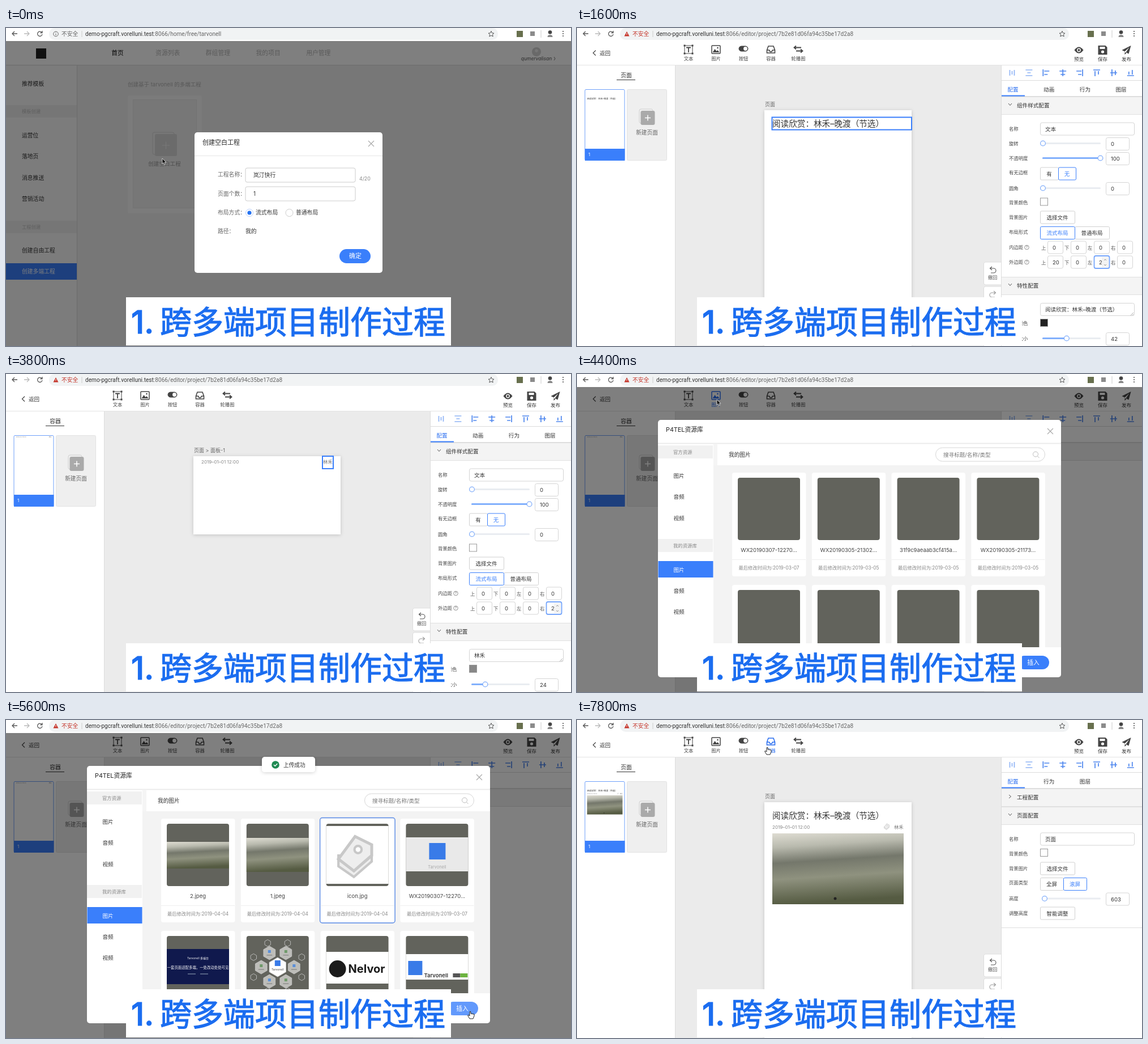
Write an HTML page that moves like this. It is 998x561 px and loops after 8 s.

```html
<!DOCTYPE html>
<html lang="zh">
<head>
<meta charset="utf-8">
<style>
html, body { margin: 0; width: 100%; height: 100%; overflow: hidden; background: #fff; }
svg { display: block; width: 100vw; height: 100vh; font-family: Inter, "Noto Sans CJK SC", "Noto Sans CJK", sans-serif; }
</style>
</head>
<body>
<svg id="stage" viewBox="0 0 998 561"></svg>
<script>
const BLUE = '#3a7ffb', INK = '#333', GREY = '#777', LINE = '#dcdcdc', SLATE = '#62635c';
const STEP = 200, LOOP = 8000;
const TITLE = '阅读欣赏：林禾–晚渡（节选）', DATE = '2019–01–01 12:00';

// Drawing helpers
const rect = (x, y, w, h, fill, stroke = 'none', rx = 0, sw = 1) =>
  `<rect x="${x}" y="${y}" width="${w}" height="${h}" fill="${fill}" stroke="${stroke}" rx="${rx}" stroke-width="${sw}"/>`;
const text = (x, y, str, size = 9.5, fill = INK, more = '') =>
  `<text x="${x}" y="${y}" font-size="${size}" fill="${fill}" ${more}>${str}</text>`;
const mid = (x, y, str, size, fill, more = '') => text(x, y, str, size, fill, `text-anchor="middle" ${more}`);
const path = (d, stroke = INK, sw = 1, fill = 'none') =>
  `<path d="${d}" stroke="${stroke}" stroke-width="${sw}" fill="${fill}"/>`;
const circle = (x, y, r, fill, stroke = 'none', sw = 1) =>
  `<circle cx="${x}" cy="${y}" r="${r}" fill="${fill}" stroke="${stroke}" stroke-width="${sw}"/>`;
const at = (x, y, body, scale = 1) => `<g transform="translate(${x} ${y}) scale(${scale})">${body}</g>`;
const cross = (x, y) => path(`M${x - 5} ${y - 5}l10 10m0-10l-10 10`, '#aaa', 1.2);
const shade = rect(0, 23, 998, 538, 'rgba(0,0,0,.5)');
const many = (list, fn) => list.map(fn).join('');

const defs = `<defs>
  <linearGradient id="view" x2=".12" y2="1">
    <stop offset="0" stop-color="#dedcd2"/><stop offset=".2" stop-color="#b9baae"/>
    <stop offset=".42" stop-color="#74776b"/><stop offset=".65" stop-color="#8f927f"/>
    <stop offset="1" stop-color="#555b42"/></linearGradient>
  <filter id="soft" x="-10%" y="-10%" width="120%" height="130%">
    <feDropShadow dx="0" dy="1" stdDeviation="3" flood-opacity=".18"/></filter>
  <clipPath id="list"><rect x="241" y="161" width="614" height="321"/></clipPath>
</defs>`;

const tag = path('M-14 9L-1 18L14 5V0H-14Z', '#c8c8c8', 2, '#eee') +
  path('M0-16L14-9V0L-1 13L-14 3Z', '#c8c8c8', 2.4, '#eee') + circle(2.5, -5, 3, '#fff', '#c8c8c8', 2);

function browser(s) {
  const home = s.view === 'home', warn = home ? '#666' : '#c5372c';
  const route = home ? '/home/free/tarvonell' : '/editor/project/7b2e81d06fa94c35be17d2a8';
  return rect(0, 0, 998, 23, '#fff') + rect(76, 0, 793, 21, '#f1f3f4', 'none', 10) +
    path('M20 10H11M15 6l-4 4l4 4', '#555', 1.3) + path('M32 10h9M37 6l4 4l-4 4', '#bbb', 1.3) +
    path('M63 7.5A4.2 4.2 0 1 0 64 11M64 5v3.5h-3.5', '#555', 1.3) +
    (home ? circle(88, 10.5, 4.3, 'none', '#666') + path('M88 10v3M88 7.8v1', '#666')
      : path('M88 6L92.5 14.5H83.5Z', 'none', 0, warn) + path('M88 9v3', '#fff')) +
    text(98, 14, '不安全', 9.8, warn) + path('M134 5v11', '#ccc') +
    text(140, 14, `demo-pgcraft.vorelluni.test<tspan fill="#666">:8066${route}</tspan>`, 10.1, INK,
      'font-family="Roboto, sans-serif"') +
    path('M857 5.5l1.5 3.3l3.5.4l-2.6 2.3l.8 3.5l-3.2-1.8l-3.2 1.8l.8-3.5l-2.6-2.3l3.5-.4z', '#555') +
    rect(902, 5, 11, 11, '#68704e') + rect(926, 6, 8, 8, '#8b8b8b') + path('M945 4v13', '#ccc') +
    circle(961, 7.5, 3.3, '#444') + path('M956.5 16q0-4 4.5-4t4.5 4z', 'none', 0, '#888') +
    many([6, 10, 14], y => circle(984, y, 1.1, '#555'));
}

function home() {
  const side = [['推荐模板', 102], ['运营位', 193], ['落地页', 230], ['消息推送', 268], ['营销活动', 305], ['创建自由工程', 396]];
  return rect(0, 23, 998, 538, '#efefef') + rect(0, 23, 998, 42, '#fff') + rect(0, 65, 125, 496, '#fafafa') +
    path('M0 65.5H998M125.5 66V561', '#d8d8d8') + rect(53, 36, 18, 18, '#222') +
    many(['首页', '资源列表', '群组管理', '我的项目', '用户管理'],
      (n, i) => mid(197 + 88.7 * i, 48, n, 10.8, i ? '#b4b4b4' : '#111')) +
    circle(937, 42, 8, '#d4d4d4') + circle(937, 40, 2.8, '#eee') +
    mid(937, 57, 'qumervalisan', 8.5, '#555', 'font-style="italic"') + path('M968 51l2 3l-2 3', GREY) +
    many(side, ([n, y]) => text(28, y, n, 9.8)) +
    many([[136, '模板创建'], [340, '工程创建']], ([y, n]) => rect(0, y, 125, 22, '#eee') + text(28, y + 14, n, 8.3, '#bbb')) +
    rect(0, 415, 125, 29, BLUE) + text(28, 433, '创建多端工程', 9.8, '#fff') +
    text(215, 103, '创建基于 tarvonell 的多端工程', 9.5, '#b0b0b0') +
    rect(215, 119, 131, 208, '#f8f8f8', 'none', 3) + rect(224.5, 126.5, 112, 191, '#efefef', '#e6e6e6') +
    rect(259, 184, 38, 39, 'none', '#d6d6d6', 3) + rect(263, 187, 39, 39, '#d8d8d8', 'none', 3) +
    path('M276 207h13M282.5 200.5v13', '#f2f2f2') + mid(280, 243, '创建空白工程', 9.6, '#999');
}

function newDialog() {
  const labels = [['工程名称：', 262], ['页面个数：', 296], ['布局方式：', 329], ['路径：', 362]];
  return shade + rect(333, 184, 332, 248, '#fff', 'none', 5) +
    text(347, 206, '创建空白工程', 11, '#222', 'font-weight="500"') + cross(645, 204) + path('M333 225.5H665', '#e6e6e6') +
    many(labels, ([n, y]) => text(374, y, n, 9.8, '#666')) +
    many([247, 280], y => rect(423, y, 194, 25, '#fff', '#ccc', 3)) +
    text(437, 263, '岚汀快行', 9.8) + text(437, 296, '1', 9.8) + text(624, 269, '4/20', 8.8, '#888') +
    circle(430, 326, 6.5, '#fff', '#b8cffc') + circle(430, 326, 3.6, '#2372f2') + text(441, 329, '流式布局', 9.8) +
    circle(500.5, 326, 6.5, '#fff', '#ccc') + text(512, 329, '普通布局', 9.8) + text(423, 362, '我的', 9.8) +
    rect(589, 390, 55, 25, BLUE, 'none', 12.5) + mid(617, 406, '确定', 11, '#fff', 'font-weight="500"');
}

const toolIcons = [
  c => path('M-7-7H7V7H-7Z', c, 1) + path('M-4-3.5H4M0-3.5V5', c, 1.8) +
    many([[-7, -7], [7, -7], [-7, 7], [7, 7]], ([x, y]) => rect(x - 1.5, y - 1.5, 3, 3, c)),
  c => rect(-7.5, -7, 15, 14, 'none', c, 1, 1.5) + path('M-6 5l4-6l3 4l2-2l3 4z', 'none', 0, c) + circle(3, -3, 1.3, c),
  c => rect(-8, -6, 16, 9, c, c, 4.5) + circle(3.5, -1.5, 3.4, '#fff'),
  c => path('M-7 1L-4.5-6H4.5L7 1V6H-7ZM-7 1H-3Q-2 4 0 4T3 1H7', c, 1.6),
  c => path('M-7-3.5H5M-4-6.5l-3.5 3l3.5 3M7 2.5H-4M4-.5l3.5 3l-3.5 3', c, 1.8),
];
const actionIcons = [
  path('M-8 0Q0-11 8 0Q0 11-8 0Z', 'none', 0, '#444') + circle(0, 0, 3.4, '#fff') + circle(0, 0, 2, '#444'),
  path('M-8-8H5L8-5V8H-8Z', 'none', 0, '#444') + rect(-5, -6, 9, 4, '#fff') + circle(0, 3, 2.6, '#fff'),
  path('M8-8L-8 0L-3 2.5L5-5L-1 4L4 6.5ZM-3 3.5V8L0 5Z', 'none', 0, '#444'),
];

function toolbar(s) {
  return rect(0, 23, 998, 42, '#fff') + path('M0 65.5H998', '#e4e4e4') +
    path('M33 39.5l-4.5 4.5l4.5 4.5', '#444', 1.2) + text(40, 48, '返回', 9.6) +
    many(['文本', '图片', '按钮', '容器', '轮播图'], (n, i) => {
      const x = 197 + 48.5 * i, c = s.hover === i ? '#2b6ff0' : '#444';
      return at(x, 38, toolIcons[i](c)) + mid(x, 57, n, 8.3, c);
    }) +
    many(['预览', '保存', '发布'], (n, i) => at(886.5 + 42 * i, 39, actionIcons[i]) + mid(886.5 + 42 * i, 58, n, 8.5));
}

// Contents of the page being edited, shared by the canvas and the thumbnail
function content(s) {
  const page = s.view === 'page', base = page ? 192 : 158;
  let out = '';
  if (page && s.title) out += text(s.titlePos[0], s.titlePos[1], s.title, 14.6);
  if (s.date) out += text(page ? 345 : s.dateX, base, s.date, 8.1, s.dateColor);
  if (s.author) out += text(s.author, base, '林禾', 8.3, GREY);
  if (s.icon) out += at(s.icon, base - 4, tag, .32);
  if (page && s.slide) out += rect(...s.slide, 'url(#view)') + circle(456, s.slide[1] + s.slide[3] - 10, 2.5, '#222');
  return out;
}

function leftPanel(s) {
  const page = s.view === 'page';
  return rect(0, 66, 173, 495, '#fff') + mid(87, 87, page ? '页面' : '容器', 9.8) + path('M70 91.5h33', INK) +
    rect(14, 108.5, 70, 125, '#fff', '#6fa0fa', 2) +
    at(14 - 331 * .27, (page ? 118 : 108) - 145 * .27, content(s), .27) +
    rect(14, 213, 70.5, 21, BLUE) + text(20, 226, '1', 8, '#fff') +
    rect(88.5, 108.5, 70, 125, '#efefef', '#e2e2e2', 2) + rect(110, 143, 24, 25, 'none', '#d0d0d0', 3) +
    rect(112.5, 146, 25, 25, '#aaa', 'none', 3) + path('M120 158.5h10M125 153.5v10', '#fff', 1.5) +
    mid(123.5, 188, '新建页面', 9.7, '#666');
}

function canvas(s) {
  const page = s.view === 'page';
  return rect(173, 66, 577, 495, '#ebebeb') + path('M173.5 66V561', '#ddd') +
    text(332, 138, page ? '页面' : '页面 &gt; 面板-1', 9, '#666') +
    `<g filter="url(#soft)">${rect(331, 145, 260, page ? 420 : 138, '#fff')}</g>` + content(s) +
    (s.outline ? rect(...s.outline, 'none', BLUE, 0, 2) : '') +
    many([413, 456, 499, 542], y => rect(718.5, y, 34, 40, '#fff', '#ddd', 3)) +
    path('M733 421l-3.5 3l3.5 3M730 424h6a4 4 0 0 1 0 8h-5', '#555', 1.1) + mid(734, 443, '撤回', 8.3, '#555') +
    path('M736 464l3.5 3l-3.5 3M739 467h-6a4 4 0 0 0 0 8h5', '#999', 1.1);
}

// Property panel pieces
const label = (y, n) => text(763, y + 3, n, 8.4, '#444');
const box = (x, y, w, str, h = 22) => rect(x + .5, y - h / 2, w, h, '#fff', '#d4d4d4', 3) + text(x + 9, y + 3.7, str);
const slider = (y, knob, n) => rect(822, y - 1.5, 103, 3, '#e9ecf1', 'none', 1.5) +
  rect(822, y - 1.5, knob - 822, 3, '#82b0fc', 'none', 1.5) + circle(knob, y, 4.4, '#fff', '#82aefa', 1.3) + box(934, y + 1, 41, n);
const swatch = (y, fill) => rect(818.5, y - 6.5, 13, 13, fill, '#999');
const button = (y, str, x = 818, w = 61, on = false) =>
  rect(x + .5, y - 11, w, 22, '#fff', on ? BLUE : '#d0d0d0', 2) + mid(x + w / 2, y + 3.7, str, 9.5, on ? BLUE : INK);
const section = (y, n, open = true) => rect(750, y, 248, 31, '#f4f4f4') + path(`M750 ${y + .5}h248m0 31h-248`, '#e0e0e0') +
  path(open ? `M762 ${y + 12}l3 3.5l3-3.5` : `M763 ${y + 11}l3.5 3l-3.5 3`, '#555') + text(777, y + 19, n, 9.6);
const help = y => circle(794.5, y, 3.8, 'none', '#777', .8) + mid(794.5, y + 2.3, '?', 6.5, '#666');

function spacing(y, name, values, focus) {
  return label(y, name) + help(y) + many(values, (v, i) => {
    const x = 831 + 41 * i;
    return text(x - 11, y + 4, '上下左右'[i], 8.4, '#555') + box(x, y, 27, v) +
      (focus === i ? rect(x + .5, y - 11, 27, 22, 'none', '#76a6fb', 3, 1.8) + rect(x + 14, y - 9, 12, 18, '#f3f3f3') +
        path(`M${x + 18} ${y - 3}l2-2l2 2m0 7l-2 2l-2-2`, '#888', .9) : '');
  });
}

function stylePanel(s) {
  const slide = s.panel === 'slide', d = slide ? 26 : 0;
  return section(121, '组件样式配置') + label(178, '名称') + box(818, 178, 166, slide ? '轮播图' : '文本') +
    (slide ? label(204, '高度') + slider(203.5, 824, '200') : '') +
    at(0, d, label(204, '旋转') + slider(203.5, 823, '0') + label(229.5, '不透明度') + slider(229.5, 924.5, '100') +
      label(254.5, '有无边框') + button(257, '有', 818, 32) + button(257, '无', 850, 31, true) +
      label(282.5, '圆角') + slider(282.5, 823, '0') + label(308, '背景颜色') + swatch(306.5, '#fff') +
      label(334, '背景图片') + button(334, '选择文件') +
      label(359.5, '布局形式') + button(361.5, '普通布局', 879) + button(361.5, '流式布局', 818, 61, true) +
      spacing(387, '内边距', [0, 0, 0, 0]) + spacing(413, '外边距', s.margin, s.focus) + section(439, '特性配置')) +
    (slide ? text(763, 520.5, '轮播图 配置', 8.4, '#555') + rect(764, 524, 216, 22, BLUE, 'none', 2) + mid(873.5, 538.5, '+添加', 9.3, '#fff')
      : box(818, 496.5, 166, s.value) + path('M983 502l-5 5m5-2l-2 2', '#999', .8) + label(521, '文字颜色') +
        swatch(520, s.color) + label(548, '文字大小') + slider(547.5, 822 + 1.02 * s.size, s.size));
}

const pagePanel = () => section(121, '工程配置', false) + section(153, '页面配置') +
  label(210, '名称') + box(818, 210, 166, '页面') + label(236, '背景颜色') + swatch(234, '#fff') +
  label(262, '背景图片') + button(262, '选择文件') +
  label(287, '页面类型') + button(289.5, '全屏', 818, 41) + button(289.5, '滚屏', 859, 41, true) +
  label(315, '高度') + slider(315, 826, '603') + label(341, '调整高度') + button(341, '智能调整') + path('M750 366.5h248', '#ddd');

function alignIcons() {
  const forms = ['M-4-5v10M4-5v10M0-3v6', 'M-6-5h12M-6 5h12M-3 0h6', 'M-5-6v12M-3-3h9M-3 3h6', 'M0-6v12M-6-3h12M-4 3h8',
    'M5-6v12M3-3h-9M3 3h-6', 'M-6-5h12M-3-3v9M3-3v6', 'M-6 0h12M-3-6v12M3-4v8', 'M-6 5h12M-3 3v-5M3 3v-8'];
  return many(forms, (d, i) => at(768.5 + 29.9 * i, 79, path(d, i < 2 ? '#8fb4f5' : '#4d86ee', 1.7)));
}

function rightPanel(s) {
  const tabs = s.panel === 'blank' ? [] : s.panel === 'page' ? ['配置', '行为', '图层'] : ['配置', '动画', '行为', '图层'];
  return rect(749, 66, 249, 495, '#fff') + path('M749.5 66V561M750 92.5h248M750 120.5h248', LINE) + alignIcons() +
    many(tabs, (n, i) => mid(770 + 63.7 * i, 112, n, 9.6, i ? INK : '#2b6ff0')) +
    (tabs.length ? rect(750, 118.5, 41, 2, BLUE) : '') +
    (s.panel === 'blank' ? section(121, '') : s.panel === 'page' ? pagePanel() : stylePanel(s));
}

// Pictures of the library, each inside a 110 pixel square
const polar = (r, turn) => [55 + r * Math.sin(turn * 2 * Math.PI), 55 + r * Math.cos(turn * 2 * Math.PI)];
const hexagon = ([x, y], r, fill) => path('M' + [0, 1, 2, 3, 4, 5].map(k =>
  `${x + r * Math.sin(k * Math.PI / 3)} ${y + r * Math.cos(k * Math.PI / 3)}`).join('L') + 'Z', '#ccc', .8, fill);
const ring = (n, r, draw) => many([...Array(n).keys()], k => draw(polar(r, (k + .5) / n), k));
const art = [
  () => rect(0, 32, 110, 47, 'url(#view)'),
  () => rect(0, 25, 110, 60, 'url(#view)'),
  () => rect(0, 4, 110, 102, '#fff') + at(51, 56, tag, 2.1),
  () => rect(0, 24, 110, 60, '#e9e9e9') + rect(41, 34, 29, 29, '#397be8') + mid(55, 79, 'Tarvonell', 7.5, '#aaa'),
  () => rect(0, 23, 110, 62, '#10194d') + mid(55, 41, 'Tarvonell 多端台', 5, '#fff') +
    mid(55, 58, '一套页面适配多端，一处改动处处可见', 6.4, '#fff') + path('M37 67h14m8 0h14', '#9ab', 1),
  () => ring(8, 46, p => hexagon(p, 6, 'none')) +
    ring(6, 29, ([x, y], k) => hexagon([x, y], 12, '#bdbdb9') + rect(x - 2.5, y - 5, 5, 5, k % 2 ? '#5b8fd8' : '#6f9a6a') +
      path(`M${x - 5} ${y + 4}h10`, '#777')) +
    hexagon([55, 55], 17, '#fff') + rect(50, 43, 10, 10, '#397be8') + mid(55, 61, 'Tarvonell', 5, '#444'),
  () => rect(0, 28, 110, 56, '#fff') + circle(20, 58, 15, '#1b1b1b') + text(39, 65, 'Nelvor', 20, '#1b1b1b', 'font-weight="700"'),
  () => rect(0, 32, 110, 45, '#fff') + rect(4, 44, 25, 25, '#397be8') + text(32, 73, 'Tarvonell', 9.5, INK, 'font-weight="600"') +
    rect(83, 66, 13, 7, '#555') + rect(96, 66, 13, 7, '#6cb33f'),
];
const oldNames = ['WX20190307-12270...', 'WX20190305-21302...', '31f9c9aeaab3cf415a...', 'WX20190305-21173...'];
const newNames = ['2.jpeg', '1.jpeg', 'icon.jpg', oldNames[0]];

function card(i, s) {
  const x = 274 + 140.8 * (i % 4), y = 174 + 198 * Math.floor(i / 4), fresh = s.loaded === 2;
  const picture = s.loaded && art[fresh ? i : i + 3], chosen = s.chosen === i;
  const day = fresh && i < 3 ? '04-04' : i === (fresh ? 3 : 0) ? '03-07' : '03-05';
  return rect(x, y, 130.5, 183, '#fff', 'none', 4) + (chosen ? rect(x - 1, y - 1.5, 132.5, 185.5, 'none', '#5a8be8', 4, 1.4) : '') +
    rect(x + 10, y + 9, 110, 110, SLATE, 'none', 4) + (picture ? at(x + 10, y + 9, picture()) : '') +
    mid(x + 65, y + 140, (fresh ? newNames : oldNames)[i % 4], 9.5, '#444') + path(`M${x} ${y + 153.5}h130`, '#eee') +
    mid(x + 65, y + 171, `最后修改时间为:2019-${day}`, 8.3, '#888');
}

function library(s) {
  const items = [['图片', 183], ['音频', 220], ['视频', 258], ['音频', 386], ['视频', 423]];
  return shade + rect(143, 81, 712, 454, '#fff', 'none', 5) + text(157, 102, 'P4TEL资源库', 10.8, '#222') + cross(836, 101) +
    path('M143 122.5h712', '#ececec', 2) + rect(241, 124, 7, 358, '#f5f5f5') +
    many([[126, '官方资源'], [291, '我的资源库']], ([y, n]) => rect(143, y, 97, 23, '#f1f1f1') + text(170, y + 15, n, 8.4, '#888')) +
    many(items, ([n, y]) => text(170.5, y, n, 9.6)) + rect(143.5, 330, 97, 29, BLUE) + text(170.5, 348.5, '图片', 9.6, '#fff') +
    text(268, 146, '我的图片', 9.7) + rect(633.5, 130, 193, 24, '#fff', '#d6d6d6', 12) +
    text(647, 145.5, '搜寻标题/名称/类型', 9.6, GREY) + circle(810, 141.5, 4.5, 'none', '#bbb') + path('M813.5 145l3 3', '#bbb') +
    `<g clip-path="url(#list)">${rect(241, 161, 614, 321, '#f3f3f3')}${many([0, 1, 2, 3, 4, 5, 6, 7], i => card(i, s))}</g>` +
    rect(778, 497, 56, 24, s.chosen ? '#6299fc' : BLUE, 'none', 12) + mid(806, 513, '插入', 10.8, '#fff') +
    (s.toast ? `<g filter="url(#soft)">${rect(452, 65, 94, 27, '#fff', 'none', 5)}</g>` + circle(476, 79, 6.8, '#1f8a52') +
      path('M473 79l2.3 2.3l4-4.3', '#fff', 1.4) + text(490, 82.5, '上传成功', 9.7) : '');
}

function cursor([x, y, hand]) {
  return at(x, y, hand
    ? path('M-1-3V4l-2-1.5q-2 0-1 1.5L-1 9H5L7 4V1L1 0V-3Q0-5-1-3Z', '#222', 1, '#fff')
    : path('M0 0V9.5L2.2 7.6L3.8 11L5.5 10.2L4 7H7Z', '#fff', .7, '#111'));
}

const caption = rect(212, 475, 574, 85, '#fff') + `<g stroke="#1b6df0" stroke-width="1.2" font-weight="500">` +
  text(221, 539, '1.', 55.8, '#1b6df0') + text(272, 539, '跨多端项目制作过程', 56, '#1b6df0') + '</g>';

// Changes that take effect at each step and last until replaced
const full = [331, 145, 260, 22];
const steps = [
  [0, { view: 'home', dialog: 'new', pointer: [276, 230] }],
  [1, { pointer: [617, 404, 1] }],
  [2, { view: 'page', dialog: '', panel: 'page', pointer: [617, 404] }],
  [3, { pointer: [197, 48, 1], hover: 0 }],
  [4, { panel: 'text', title: '文本', value: '文本', titlePos: [331, 162], outline: full, size: 42, color: '#222', margin: [0, 0, 0, 0], hover: -1 }],
  [5, { pointer: [880, 496] }],
  [6, { title: TITLE, value: TITLE, pointer: null }],
  [7, { margin: [20, 0, 0, 0], focus: 0, titlePos: [331, 174], outline: [331, 157.5, 260, 22] }],
  [8, { margin: [20, 0, 2, 0], focus: 2, titlePos: [345, 174], outline: [344.5, 157.5, 246.5, 22] }],
  [9, { margin: [20, 0, 20, 0] }],
  [10, { panel: 'page', outline: null, focus: -1, pointer: [480, 400] }],
  [11, { hover: 3, pointer: [343, 50, 1] }],
  [12, { view: 'box', panel: 'blank', hover: -1, pointer: [430, 220] }],
  [13, { panel: 'text', date: DATE, dateX: 331, dateColor: INK, value: '2019-01-01 12:00', outline: full, margin: [0, 0, 0, 0], size: 32, pointer: null }],
  [14, { dateColor: '#888', color: '#888', size: 24, pointer: [597, 168] }],
  [16, { margin: [0, 0, 20, 0], focus: 2, dateX: 345, outline: [344.5, 145, 246.5, 22], pointer: null }],
  [18, { author: 560, value: '林禾', margin: [0, 0, 0, 20], focus: 3, outline: [559, 145, 19, 22] }],
  [20, { panel: 'blank', outline: null, focus: -1, pointer: [480, 240] }],
  [21, { hover: 1, pointer: [247, 45] }],
  [22, { dialog: 'lib', loaded: 0 }],
  [23, { loaded: 1, hover: -1 }],
  [25, { pointer: [620, 300] }],
  [27, { loaded: 2, toast: 1, pointer: [620, 240, 1] }],
  [28, { chosen: 2, pointer: [820, 518, 1] }],
  [29, { dialog: '', icon: 547, outline: [540, 145, 14, 19], panel: 'blank', pointer: [820, 518] }],
  [31, { view: 'page', panel: 'page', outline: null, pointer: [87, 160] }],
  [32, { hover: 4, pointer: [391, 50, 1] }],
  [33, { hover: -1, panel: 'slide', margin: [0, 0, 0, 0], outline: [331, 200, 260, 139], pointer: [587, 276] }],
  [34, { pointer: [873, 535, 1] }],
  [35, { slide: [331, 200, 260, 139] }],
  [36, { slide: [345, 200, 232, 125], outline: [344.5, 200, 233, 125], margin: [0, 0, 20, 20], pointer: null }],
  [38, { panel: 'page', outline: null, pointer: [480, 420] }],
  [39, { hover: 3, pointer: [336, 52, 1] }],
];
const stateAt = n => Object.assign({}, ...steps.filter(([from]) => from <= n).map(row => row[1]));

function scene(s) {
  const body = s.view === 'home' ? home() : canvas(s) + leftPanel(s) + toolbar(s) + rightPanel(s);
  const dialog = s.dialog === 'new' ? newDialog() : s.dialog === 'lib' ? library(s) : '';
  return defs + body + dialog + browser(s) + caption + (s.pointer ? cursor(s.pointer) : '');
}

const stage = document.getElementById('stage');
const start = performance.now();
let shown = -1;
function tick(now) {
  const n = Math.floor(Math.max(0, now - start) % LOOP / STEP);
  if (n !== shown) stage.innerHTML = scene(stateAt(shown = n));
  requestAnimationFrame(tick);
}
tick(start);
</script>
</body>
</html>
```
